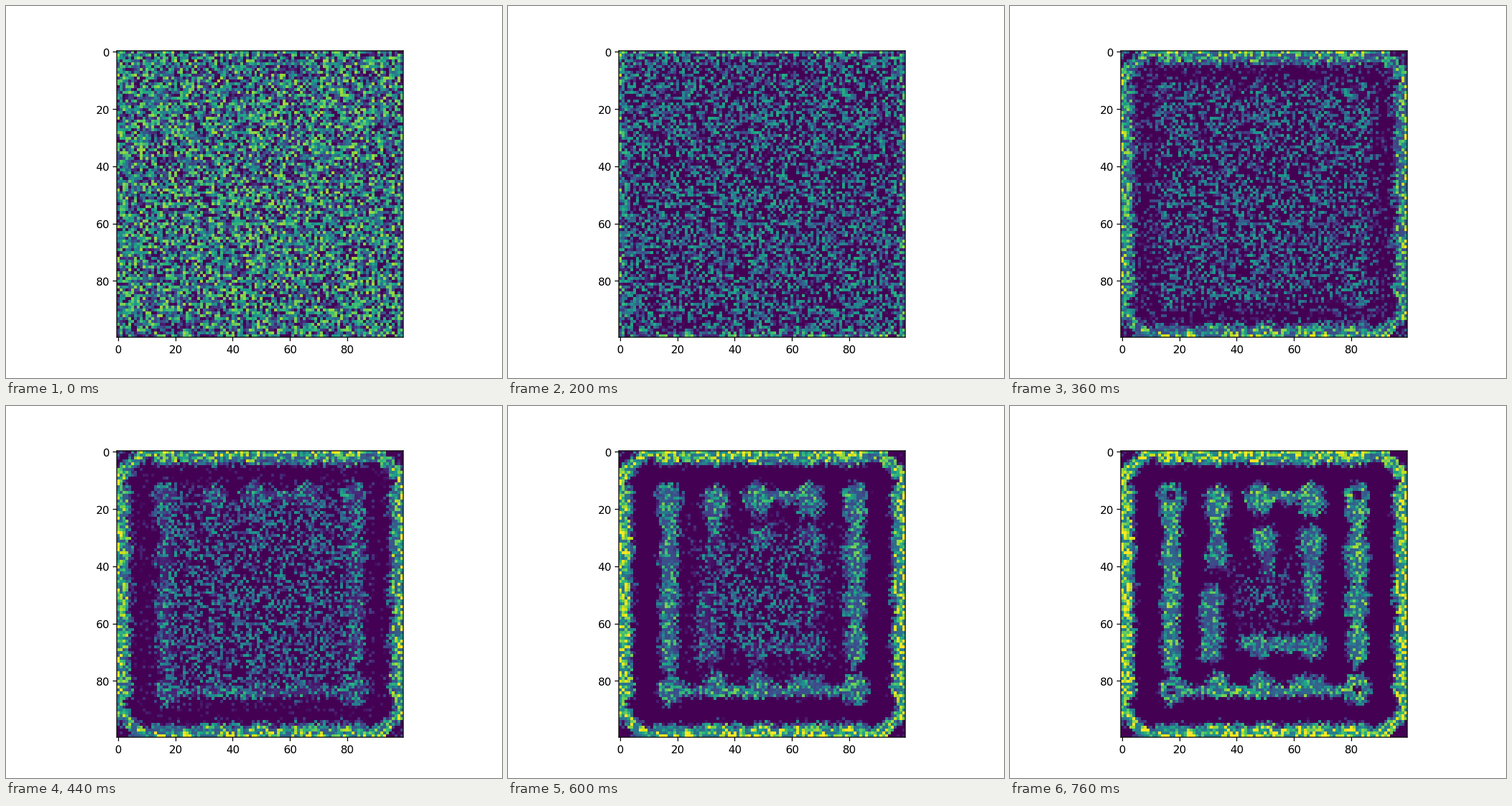
A matplotlib script that plays this animation: 864 by 648 pixels, repeating every 0.8 s.

```python
import numpy as np
import matplotlib.pyplot as plt
from matplotlib.animation import FuncAnimation

N = 100
STEPS = 20
rng = np.random.default_rng(7)
y, x = np.mgrid[0:N, 0:N].astype(float)
cx, cy = np.minimum(x, N - 1 - x), np.minimum(y, N - 1 - y)
depth = np.minimum(cx, cy)
diag = cx + cy

# Upright spots and stripes: x, top, bottom, radius
UPRIGHT = [
    (17, 15, 18, 4), (33, 16, 20, 4), (48, 15, 17, 4.2), (66, 15, 18, 4),
    (82, 15, 20, 3.8), (17, 16, 74, 2.6), (17, 37, 38, 3.6),
    (17, 52, 54, 3.2), (17, 68, 71, 3.2), (17.5, 83, 83, 4.5),
    (82, 20, 72, 2), (82, 33, 41, 3.8), (82, 50, 55, 3.8),
    (82, 64, 70, 3.4), (82, 82, 83, 4.5), (33.5, 81, 82, 3.6),
    (48.5, 81, 82, 3.8), (33, 20, 30, 1.8), (33, 34, 37, 3.6),
    (49.5, 30, 32, 4.2), (51, 32, 50, 2), (66, 30, 33, 3.8),
    (66, 35, 56, 2.8), (31, 50, 70, 3.2), (48, 67, 68, 3.2),
    (66, 67, 68.5, 3.6),
]
# Level stripes: left, right, y, radius
LEVEL = [(44, 68, 15.5, 1.8), (20, 80, 83.5, 1.6), (62, 68, 82, 3.2), (43, 68, 67, 2.2)]
HOLES = [(17, 15), (82, 15), (17, 83), (82, 82.5)]


def capsule(x0, y0, x1, y1, r):
    """Signed distance inside a round-ended stripe along an axis."""
    return r + 0.5 - np.hypot(x - np.clip(x, x0, x1), y - np.clip(y, y0, y1))


def rim():
    """Wavy band along the border with cut-off corners."""
    along = np.where(cx < cy, y, x)
    width = 4.6 + 0.4 * np.cos(2 * np.pi * (along - 17) / 16)
    width -= 2.2 * np.exp(-((np.maximum(cx, cy) - 10) / 2.5) ** 2)
    band = np.maximum(width - depth, 12.5 - diag)
    return np.minimum(band, diag - 5.5)


def pattern():
    """Growth direction of each cell: positive in the bands, negative in the gaps."""
    field = rim()
    for px, top, bottom, r in UPRIGHT:
        field = np.maximum(field, capsule(px, top, px, bottom, r))
    for left, right, py, r in LEVEL:
        field = np.maximum(field, capsule(left, py, right, py, r))
    field = 0.6 * field + rng.normal(0, 0.25, (N, N))
    field = np.clip(field, -1, np.where(depth < 8, 1, 0.75))
    return np.where(field < 0, 1.45 * field, field)


def simulate():
    grid = np.clip(rng.random((N, N)) - 0.13, 0, 1)
    shape = pattern()
    onset = 3.6 + 0.32 * depth
    hole = sum(np.hypot(x - hx, y - hy) < 1.6 for hx, hy in HOLES)
    states = [grid]
    for k in range(1, STEPS):
        decay = 0.33 * (np.exp(-(k - 1) / 4) - np.exp(-k / 4))
        age = k - onset
        gain = 0.115 * np.clip(age / 2, 0, 1) * np.exp(-np.maximum(age, 0) / 6)
        drift = shape * gain - decay
        if k <= 5:
            drift = drift + 0.03 * np.exp(-depth) + 0.07 * np.exp(-diag / 4)
        if k > 15:
            drift = drift - 0.14 * hole
        grid = np.clip(grid + drift, 0, 1)
        states.append(grid)
    return states


states = simulate()
fig, ax = plt.subplots(figsize=(6.4, 4.8), dpi=135)
image = ax.imshow(states[0], cmap="viridis", vmin=0, vmax=1, interpolation="nearest")


def update(i):
    image.set_data(states[i])
    return [image]


anim = FuncAnimation(fig, update, frames=STEPS, interval=40, repeat=True)
plt.show()
```
